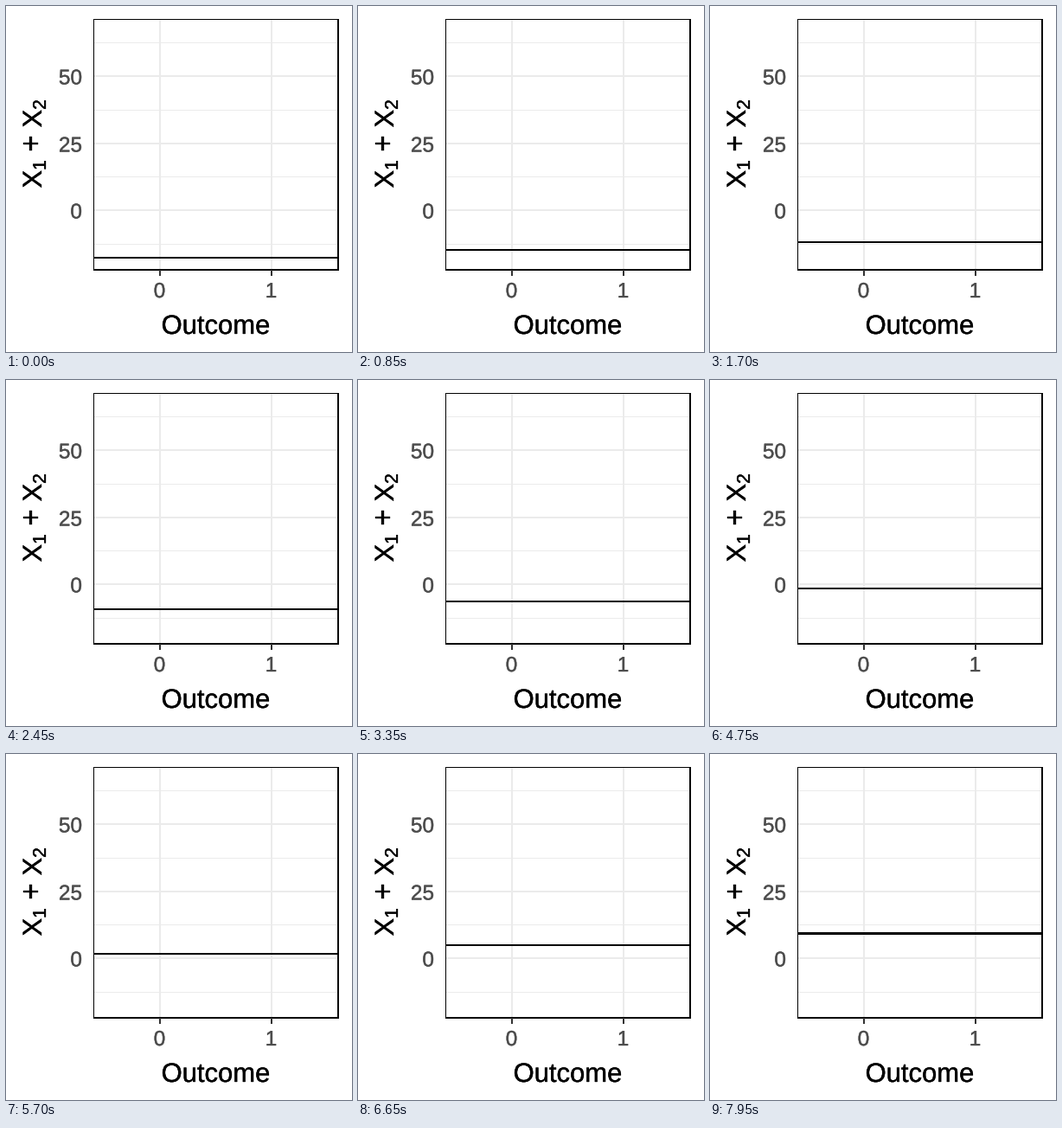
Write a matplotlib script that moves like this. It is 400 px wide and 400 px high and loops after 8000 ms.

```python
import math
import matplotlib.pyplot as plt
from matplotlib.animation import FuncAnimation
from matplotlib.patches import Rectangle
from matplotlib.patheffects import withStroke

SIZE, DPI = 400, 100
FRAMES, STEP_MS = 160, 50
LEFT, TOP, RIGHT, BOTTOM = 101, 15, 385, 306
GRID, TICK, LABEL = "#EBEBEB", "#333333", "#4D4D4D"
TITLE_PX, LABEL_PX, SUB_PX, PLUS_PX = 31, 24.44, 21.4, 34

# The line climbs evenly and snaps to whole pixels; its lower edge lags a little
START_Y, THICK = 290, 2
SPEED, PHASE, LAG = 0.5273, 0.18, 0.0003

plt.rcParams["font.family"] = "Liberation Sans"
fig = plt.figure(figsize=(SIZE / DPI, SIZE / DPI), dpi=DPI, facecolor="white")
ax = fig.add_axes([0, 0, 1, 1])
ax.set_xlim(0, SIZE)
ax.set_ylim(SIZE, 0)
ax.axis("off")


def box(x0, y0, x1, y1, color, z=1):
    patch = Rectangle((x0, y0), x1 - x0, y1 - y0, facecolor=color,
                      linewidth=0, antialiased=False, zorder=z)
    return ax.add_patch(patch)


def write(x, y, text, px, color="black", ha="left", angle=0):
    ax.text(x, y, text, fontsize=px * 72 / DPI, color=color, ha=ha,
            va="baseline", rotation=angle, rotation_mode="anchor",
            path_effects=[withStroke(linewidth=0.25, foreground=color)])


# Horizontal grid with its labels
for i in range(4):
    y = 42 + round(77.6 * i)
    box(LEFT, y, RIGHT, y + 1, GRID)
for i, text in enumerate(("50", "25", "0")):
    y = 80 + round(77.6 * i)
    box(LEFT, y, RIGHT, y + 2, GRID)
    write(88, y + 10.5, text, LABEL_PX, LABEL, "right")

# Vertical grid with ticks and labels
for x, text in ((177, "0"), (306, "1")):
    box(x, TOP, x + 2, BOTTOM, GRID)
    box(x, BOTTOM - 1, x + 2, BOTTOM + 6, TICK, 4)
    write(x + 0.5, 337, text, LABEL_PX, LABEL, "center")

# Panel border
box(LEFT, TOP, RIGHT, TOP + 1, "black", 3)
box(LEFT, BOTTOM - 2, RIGHT, BOTTOM, "black", 3)
box(LEFT, TOP, LEFT + 1, BOTTOM, "black", 3)
box(RIGHT - 2, TOP, RIGHT, BOTTOM, "black", 3)

# Axis titles
write(242.5, 379, "Outcome", TITLE_PX, ha="center")
for y, digit in ((210.5, "1"), (140.5, "2")):
    write(41, y, "X", TITLE_PX, angle=90)
    write(46, y - 20.5, digit, SUB_PX, angle=90)
write(40, 169, "+", PLUS_PX, angle=90)

line = box(LEFT + 1, START_Y, RIGHT - 2, START_Y + THICK, "black", 2)


def update(i):
    rise = SPEED * i + PHASE
    top = START_Y - math.floor(rise)
    bottom = START_Y + THICK - math.floor(rise - LAG * i)
    line.set_y(top)
    line.set_height(bottom - top)
    return [line]


anim = FuncAnimation(fig, update, frames=FRAMES, interval=STEP_MS,
                     repeat=True, repeat_delay=0, blit=False)
plt.show()
```
